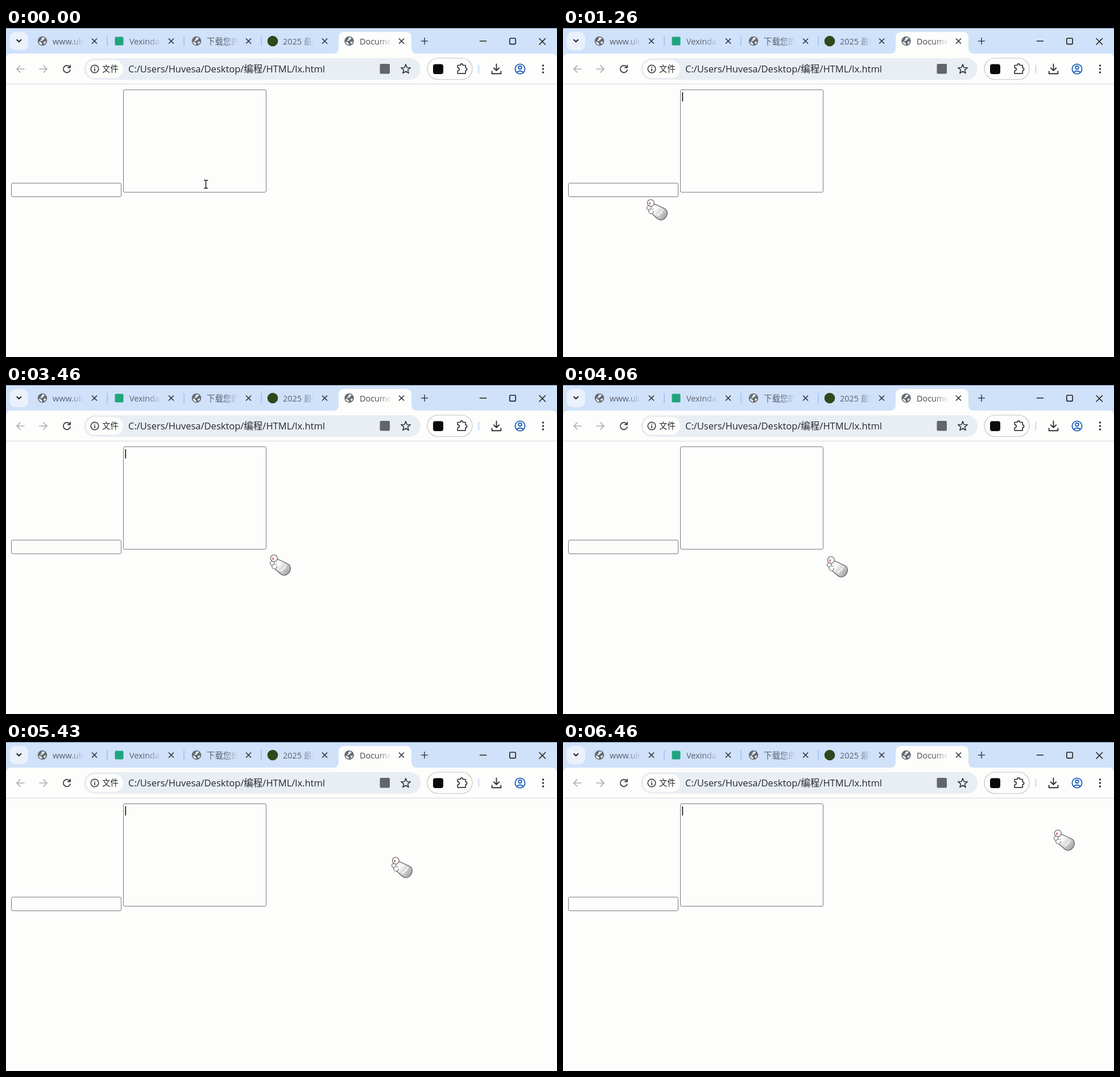
An HTML page for the animation above (6.52 s loop, 969 by 578 pixels).

```html
<!DOCTYPE html>
<html lang="zh">
<head>
<meta charset="utf-8">
<title>Browser window</title>
<style>
  html, body { margin: 0; width: 100%; height: 100%; overflow: hidden; background: #fdfdfb; }
  svg { display: block; }
  text { font-family: "Open Sans", "Noto Sans CJK SC", "Noto Sans CJK", sans-serif; }
  .line { fill: none; stroke-linecap: round; stroke-linejoin: round; }
</style>
</head>
<body>
<svg id="stage" width="969" height="578" viewBox="0 0 969 578">
  <defs>
    <linearGradient id="fadeBar"><stop offset="0" stop-color="#d0e1fa" stop-opacity="0"/><stop offset=".65" stop-color="#d0e1fa"/></linearGradient>
    <linearGradient id="fadePage"><stop offset="0" stop-color="#fdfdfb" stop-opacity="0"/><stop offset=".65" stop-color="#fdfdfb"/></linearGradient>
    <linearGradient id="fur" x1="0" y1="0" x2="1" y2=".75">
      <stop offset=".4" stop-color="#f6f6f6"/><stop offset=".62" stop-color="#d4d4d4"/><stop offset="1" stop-color="#a2a2a2"/>
    </linearGradient>
    <g id="globe">
      <circle r="8.3"/>
      <path fill="#e9eef6" d="M-6.5 1Q-3 1-1.5 3.2Q0 3.8-.3 6.7Q-5.5 6.2-6.5 1ZM-1-5.8Q2.2-7.2 4-5.2Q3.8-3 1.7-2.7Q1.3-.6-1.2-.6Q-2 1-4.2-.6Q-1.2-2-1-5.8ZM2.5 1.2Q4.8.2 6.5 1Q5.5 4.6 3.4 5.4Q3.2 3.5 2.1 3.1Z"/>
    </g>
    <path id="cross" d="M-4-4L4 4M4-4L-4 4"/>
  </defs>

  <rect width="969" height="578" fill="#fdfdfb"/>
  <rect width="969" height="58" fill="#d0e1fa"/>
  <rect width="969" height="1" fill="#7790b5"/>
  <path fill="#fdfdfb" d="M0 98V54Q0 45 9 45H575Q585 45 585 35V17Q585 7 595 7H703Q713 7 713 17V35Q713 45 723 45H960Q969 45 969 54V98Z"/>
  <rect y="98" width="969" height="1" fill="#d3d8e2"/>

  <rect x="6.5" y="7" width="32.5" height="32" rx="10" fill="#eaf1fc"/>
  <path class="line" d="M19.2 20.7L22.8 24.3L26.4 20.7" stroke="#1f1f1f" stroke-width="2"/>
  <g id="tabs"></g>

  <g class="line" stroke="#1f1f1f" stroke-width="1.6">
    <path d="M730.5 23H741.5M736 17.5V28.5" stroke="#3c4350"/>
    <path d="M833.5 23H844.5"/>
    <rect x="885.8" y="18" width="10.4" height="10.4" rx="1.8"/>
    <path d="M938 18.5L948.5 29M948.5 18.5L938 29"/>
  </g>

  <rect x="137" y="53" width="592" height="38" rx="19" fill="#e9eef5"/>
  <rect x="141" y="56.5" width="65" height="31" rx="15.5" fill="#fdfdfb"/>
  <g class="line" stroke-width="1.7">
    <path d="M32 72H19M25 66L19 72L25 78M59 72H72M66 66L72 72L66 78" stroke="#a9adb3"/>
    <g stroke="#30343a">
      <path d="M112 68.4A6.2 6.2 0 1 0 113 73.8M113 65.3V69.6H108.7"/>
      <circle cx="156" cy="72" r="6.8" stroke-width="1.5"/>
      <path d="M156 71.6V75.3M156 68.7V68.8"/>
      <path id="star" stroke-width="1.6"/>
      <path d="M794.2 65.5H799Q799 62.8 801.2 62.8T803.4 65.5H808.2V70Q810.6 70 810.6 72.4T808.2 74.8V79.8H794.2V75.4Q797.2 75 797.2 72.5T794.2 69.7Z"/>
      <path d="M862.5 63.5V74.5M857.8 70.2L862.5 74.8L867.2 70.2M854.6 76.3V80.2H870.4V76.3" stroke-width="1.9"/>
    </g>
    <rect x="741" y="53" width="79" height="37.5" rx="18.7" stroke="#c2c5c9" stroke-width="1.2"/>
    <g stroke="#2462bd" stroke-width="1.9">
      <circle cx="904" cy="72" r="8.6"/>
      <circle cx="904" cy="69.5" r="2.8"/>
      <path d="M898.4 77.8Q904 73.4 909.6 77.8"/>
    </g>
  </g>
  <rect x="657.5" y="63" width="17.5" height="17.5" rx="2" fill="#62666c"/>
  <rect x="751" y="63.5" width="18" height="17.5" rx="4" fill="#0a0a0a"/>
  <rect x="830.3" y="64.5" width="2" height="15" rx="1" fill="#c9dbf6"/>
  <g fill="#30343a"><circle cx="944.5" cy="66" r="1.8"/><circle cx="944.5" cy="72" r="1.8"/><circle cx="944.5" cy="78" r="1.8"/></g>
  <text x="169" y="77.3" font-size="14.4" fill="#24272c">文件</text>
  <text x="215" y="77.5" font-size="16.5" fill="#24272c">C:/Users/Huvesa/Desktop/编程/HTML/lx.html</text>

  <g fill="#fdfdfb" stroke="#7b7b80" stroke-width="1">
    <rect x="9.5" y="272.5" width="193" height="24" rx="2.5"/>
    <rect x="206.5" y="108.5" width="251" height="180" rx="2.5"/>
  </g>
  <rect id="caret" x="209.5" y="113" width="1.6" height="16" fill="#111"/>

  <g id="beam" class="line">
    <path transform="translate(.5 -.5)" d="M-3-7H-1L0-6.3L1-7H3M0-6.3V6.3M-3 7H-1L0 6.3L1 7H3" stroke="#111" stroke-width="1.4"/>
  </g>
  <g id="paw" stroke="#555" stroke-width="1.1">
    <path fill="url(#fur)" d="M7 11Q11 7 16 9L33 17Q37.5 21 36 27Q33 36 25 36.5Q21 36 18 33L6 22Z"/>
    <path fill="none" stroke="#fafafa" stroke-width="1.4" d="M19 29L21 26L22 28L25 22L26 24L29 17"/>
    <circle cx="4.3" cy="15" r="3.8" fill="#fff"/>
    <circle cx="8" cy="21" r="4.2" fill="#fff"/>
    <circle cx="12" cy="17" r="3.6" fill="#fff" stroke="none"/>
    <circle cx="7.3" cy="6.4" r="5.9" fill="#fff"/>
    <ellipse cx="5.6" cy="7.2" rx="1.8" ry="2.2" fill="#d07f89" stroke="none"/>
    <path fill="none" stroke="#b9838a" d="M8.5 17.5Q11 18.5 12.5 16"/>
  </g>
</svg>
<script>
const byId = id => document.getElementById(id);
const LOOP = 6520, LAST = 6460;

const globe = x => `<use href="#globe" x="${x}" y="23" fill="#666b72"/>`;
const tabs = [
  { x: 82, label: "www.ulo", icon: globe(64) },
  { x: 217, label: "Vexinda", icon: '<rect x="191.5" y="15.5" width="15" height="15" rx="2" fill="#1fa57c"/>' },
  { x: 353, label: "下载您的", icon: globe(335) },
  { x: 487, label: "2025 最新", icon: '<circle cx="469" cy="23" r="9.3" fill="#2f481c"/>' },
  { x: 622, label: "Docume", icon: globe(603.5), active: true },
];
byId("tabs").innerHTML = tabs.map(({ x, label, icon, active }, i) => `
  ${icon}
  <text x="${x}" y="28.5" font-size="14.4" fill="${active ? "#43474d" : "#59616d"}">${label}</text>
  <rect x="${x + 31}" y="10" width="38" height="28" fill="url(#${active ? "fadePage" : "fadeBar"})"/>
  <use href="#cross" x="${x + 73.5}" y="23" class="line" stroke="#30343a" stroke-width="1.7"/>
  ${i < 3 ? `<rect x="${x + 95}" y="14" width="2" height="18" rx="1" fill="#a9c6f3"/>` : ""}`).join("");

byId("star").setAttribute("d", "M" + Array.from({ length: 10 }, (_, i) => {
  const r = i % 2 ? 3.7 : 8.6, a = (i / 5 - 0.5) * Math.PI;
  return `${(703 + r * Math.cos(a)).toFixed(1)} ${(72.5 + r * Math.sin(a)).toFixed(1)}`;
}).join("L") + "Z");

// Pointer path: time, x, y, and the cursor shown from that time on.
const BEAM = "beam", PAW = "paw";
const path = [
  [0, 351, 275, BEAM], [450, 335, 281, BEAM], [690, 285, 287, BEAM],
  [760, 262, 292, PAW], [960, 198, 307, PAW], [1260, 147, 301, PAW], [1400, 141, 297, PAW],
  [1500, 142, 288, BEAM], [1900, 172, 282, BEAM],
  [2090, 204, 276, PAW], [2140, 210, 274, BEAM], [2360, 236, 268, BEAM],
  [2950, 370, 276, BEAM], [3300, 440, 285, BEAM],
  [3400, 460, 293, PAW], [3700, 472, 312, PAW], [4060, 464, 301, PAW], [4350, 461, 309, PAW],
  [4600, 456, 287, BEAM], [5000, 456, 300, BEAM], [5200, 457, 297, BEAM], [5320, 475, 260, BEAM],
  [5350, 510, 240, PAW], [5570, 914, 161, PAW], [5760, 889, 154, PAW], [6000, 872, 154, PAW], [LAST, 863, 153.5, PAW],
];

// Slope at a key, flat at turning points so the path never overshoots.
function slope(i, axis) {
  const a = path[i - 1], b = path[i], c = path[i + 1];
  if (!a || !c) return 0;
  const left = (b[axis] - a[axis]) / (b[0] - a[0]);
  const right = (c[axis] - b[axis]) / (c[0] - b[0]);
  return left * right <= 0 ? 0 : 2 * left * right / (left + right);
}

function hermite(i, axis, t) {
  const a = path[i], b = path[i + 1], d = b[0] - a[0], u = (t - a[0]) / d;
  const s = u * u * (3 - 2 * u);
  return a[axis] + (b[axis] - a[axis]) * s
    + d * u * (1 - u) * ((1 - u) * slope(i, axis) - u * slope(i + 1, axis));
}

function pointer(t) {
  const next = path.findIndex(key => key[0] > t);
  if (next < 0) return path[path.length - 1].slice(1);
  const i = next - 1;
  return [hermite(i, 1, t), hermite(i, 2, t), path[i][3]];
}

// Blinking restarts when the field is clicked.
function caretOn(t) {
  const start = t < 2700 ? 760 : 3040;
  return t >= start && (t - start) % 1060 < 530;
}

// Thirty pictures a second, each starting on a whole 10 ms: 0, 30, 60, 100, ...
function snap(time) {
  const start = Math.floor((time + 7) * 3 / 100) * 100 / 3;
  return Math.min(LAST, Math.floor(start / 10 + 0.01) * 10);
}

function render(time) {
  const t = snap(time);
  const [x, y, kind] = pointer(t);
  for (const id of [BEAM, PAW]) {
    byId(id).setAttribute("visibility", id === kind ? "visible" : "hidden");
  }
  byId(kind).setAttribute("transform", `translate(${Math.round(x)} ${Math.round(y)})`);
  byId("caret").setAttribute("visibility", caretOn(t) ? "visible" : "hidden");
}

const begin = performance.now();
function tick() {
  render((performance.now() - begin) % LOOP);
  requestAnimationFrame(tick);
}
tick();
</script>
</body>
</html>
```
